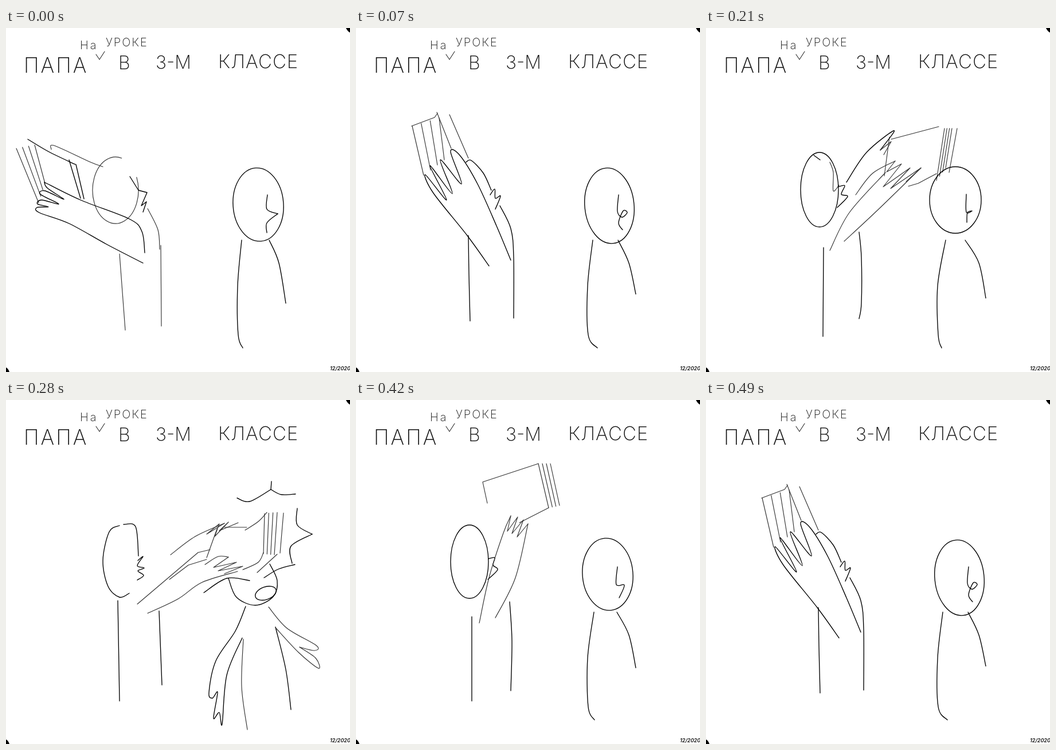
Write an HTML page with a canvas that moves like this. It is 600 by 600 pixels and loops after 560 ms.

```html
<!DOCTYPE html>
<html lang="ru">
<head>
<meta charset="utf-8">
<title>Папа на уроке в 3-м классе</title>
<style>
html, body { margin: 0; width: 100%; height: 100%; overflow: hidden; background: #fff; }
canvas { display: block; }
</style>
</head>
<body>
<canvas id="stage" width="600" height="600"></canvas>
<script>
const ctx = document.getElementById('stage').getContext('2d');
const STEP = 70;

function pen(color, width) {
  ctx.strokeStyle = color;
  ctx.lineWidth = width;
}
const ink = () => pen('#000', 1.35);
const soft = () => pen('#333', 1.15);

function line(...p) {
  ctx.beginPath();
  for (let i = 0; i < p.length; i += 2) ctx.lineTo(p[i], p[i + 1]);
  ctx.stroke();
}

// smooth stroke through the given points
function curve(...p) {
  const at = i => p[i < 0 ? i + 2 : i >= p.length ? i - 2 : i];
  const ahead = i => p[i] + (at(i + 2) - at(i - 2)) / 6;
  const behind = i => p[i] - (at(i + 2) - at(i - 2)) / 6;
  ctx.beginPath();
  ctx.moveTo(p[0], p[1]);
  for (let i = 2; i < p.length; i += 2) {
    ctx.bezierCurveTo(ahead(i - 2), ahead(i - 1), behind(i), behind(i + 1), p[i], p[i + 1]);
  }
  ctx.stroke();
}

function oval(x, y, rx, ry, tilt = 0, from = 0, to = 2 * Math.PI) {
  ctx.beginPath();
  ctx.ellipse(x, y, rx, ry, tilt, from, to);
  ctx.stroke();
}

// evenly spaced lines from a first line to a last one
function hatch(count, first, last) {
  for (let i = 0; i < count; i++) {
    line(...first.map((v, k) => v + (last[k] - v) * i / (count - 1)));
  }
}

function pupil(x, y, rx, ry, tilt, neck, foot, hand) {
  ink();
  oval(x, y, rx, ry, tilt);
  curve(neck, 370, 404, 450, 405, 535, foot, 558);
  curve(870 - neck, 370, 476, 410, 488, hand);
}

function write(text, x, y, size, spacing = 0, style = '200') {
  ctx.font = `${style} ${size}px Inter, "Open Sans", sans-serif`;
  ctx.letterSpacing = spacing + 'px';
  ctx.fillText(text, x, y);
}

function caption() {
  ctx.fillStyle = '#111';
  write('ПАПА', 31, 78, 36, 3);
  write('В', 196, 72, 32);
  write('3-М', 261, 71, 32);
  write('КЛАССЕ', 370, 70, 33, 1);
  write('На', 129, 37, 20, 3);
  write('УРОКЕ', 174, 32, 20, 2);
  write('12/2020', 565, 597, 9, 0, 'italic 600');
  soft();
  line(157, 46, 163, 55, 172, 41);
  ctx.fillStyle = '#000';
  ctx.fill(new Path2D('M593 0Q595 5 600 8V0ZM0 592Q4 594 6 600H0Z'));
}

function swungBack() {
  soft();
  oval(191, 283, 40, 58, 0, -0.4, 4.98);
  hatch(4, [18, 210, 57, 305], [50, 204, 68, 271]);
  curve(79, 212, 84, 205, 145, 233, 169, 242);
  line(198, 394, 208, 527);
  curve(247, 315, 265, 352, 268, 386);
  line(270, 379, 271, 520);
  ink();
  curve(38, 194, 75, 216, 121, 238);
  hatch(2, [110, 230, 130, 297], [122, 238, 136, 298]);
  line(216, 259, 231, 283, 246, 287, 236, 310, 245, 303, 239, 321);
  curve(67, 269, 130, 300, 215, 333, 237, 355, 242, 392);
  curve(67, 269, 72, 279, 101, 299, 68, 284, 60, 290, 92, 307, 62, 300, 55, 307, 74, 312, 54, 313, 58, 322, 110, 341, 175, 377, 239, 410);
  pupil(440, 308, 44, 64, -0.07, 411, 413, 480);
  curve(456, 291, 455, 316, 474, 324);
  curve(474, 324, 455, 340, 455, 357);
}

function overShoulder() {
  soft();
  hatch(4, [98, 171, 118, 257], [145, 157, 154, 230]);
  line(97, 171, 137, 156, 142, 149);
  hatch(2, [141, 147, 166, 210], [163, 151, 196, 227]);
  ink();
  curve(232, 415, 194, 362, 135, 288, 121, 256, 158, 300, 129, 240, 168, 289, 147, 230, 184, 272, 165, 216, 181, 222, 212, 272, 245, 345, 270, 405);
  curve(192, 234, 201, 231, 222, 253, 236, 283);
  curve(234, 291, 242, 281, 243, 297, 252, 293, 243, 316);
  curve(251, 310, 270, 350, 275, 400, 275, 506);
  curve(196, 362, 197, 430, 199, 511);
  pupil(442, 310, 43, 66, -0.1, 413, 421, 464);
  curve(458, 291, 456, 320, 464, 330, 473, 322, 466, 319, 458, 340, 465, 352);
}

function overhead() {
  ink();
  oval(198, 282, 33, 64);
  curve(231, 277, 242, 275, 239, 288, 247, 296, 230, 313);
  line(202, 378, 202, 525);
  curve(268, 352, 272, 420, 270, 507);
  soft();
  line(229, 180, 221, 143, 318, 111);
  hatch(4, [318, 111, 336, 188], [339, 111, 355, 184]);
  line(285, 214, 336, 188);
  curve(215, 389, 232, 310, 257, 232, 270, 202);
  line(270, 202, 264, 229, 282, 204, 272, 233, 292, 209, 281, 239, 300, 216);
  curve(300, 216, 278, 310, 243, 380);
  pupil(439, 304, 44, 63, -0.08, 415, 416, 467);
  curve(456, 291, 454, 322, 468, 323, 459, 345);
}

function comingDown() {
  soft();
  hatch(4, [416, 175, 402, 266], [429, 175, 418, 244]);
  line(438, 175, 424, 252);
  line(323, 194, 406, 172);
  line(353, 276, 370, 271, 402, 254);
  line(320, 190, 311, 258);
  curve(216, 234, 222, 252, 222, 284, 232, 274);
  ink();
  oval(198, 282, 33, 65);
  line(188, 222, 199, 230);
  curve(231, 277, 242, 275, 236, 290, 247, 294, 229, 313);
  line(205, 383, 204, 538);
  curve(267, 356, 271, 400, 271, 480, 267, 507);
  curve(245, 269, 280, 217, 328, 179, 304, 213);
  soft();
  line(304, 213, 323, 198, 310, 221);
  curve(261, 291, 290, 254, 330, 232);
  line(330, 232, 315, 251, 341, 237, 309, 277, 356, 244, 322, 280, 375, 244, 349, 268);
  curve(216, 388, 250, 322, 313, 252);
  curve(241, 372, 300, 317, 375, 244);
  pupil(435, 300, 45, 58, 0, 418, 411, 471);
  curve(454, 290, 454, 321, 464, 319, 456, 322, 455, 339);
}

function impact() {
  soft();
  hatch(4, [451, 198, 449, 268], [473, 196, 468, 270]);
  line(484, 197, 478, 267);
  line(368, 225, 350, 275);
  line(381, 222, 420, 222);
  curve(417, 227, 440, 212, 455, 196);
  curve(413, 296, 440, 283, 449, 266);
  line(438, 301, 473, 269);
  curve(287, 270, 330, 238, 381, 215);
  line(381, 215, 350, 234, 372, 216, 364, 238, 388, 213, 372, 228, 405, 214);
  line(229, 356, 335, 266, 356, 261);
  line(285, 313, 318, 288, 350, 278);
  curve(347, 287, 370, 273, 388, 274);
  line(388, 274, 362, 292, 402, 283, 370, 298, 413, 290, 381, 303);
  curve(247, 372, 300, 347, 342, 318, 404, 299);
  ink();
  curve(215, 337, 198, 344, 178, 325, 169, 280, 180, 230, 198, 219);
  curve(205, 217, 226, 221, 231, 272);
  curve(230, 280, 239, 273, 229, 289, 241, 293, 230, 298, 240, 306, 229, 314);
  line(195, 350, 198, 525);
  line(267, 368, 272, 497);
  // shouting face
  curve(388, 311, 402, 344, 435, 358, 466, 343, 473, 315, 460, 286);
  curve(345, 336, 385, 311, 425, 315);
  curve(450, 310, 475, 295, 504, 287);
  oval(453, 337, 19, 11, -0.35);
  // shock marks
  curve(403, 171, 425, 177, 462, 156);
  line(462, 156, 463, 142);
  curve(462, 156, 480, 165, 505, 164);
  curve(508, 189, 508, 218, 534, 234);
  curve(534, 234, 497, 255, 499, 285);
  // flung arms
  curve(418, 360, 400, 403, 366, 455, 354, 510, 360, 520, 369, 510, 362, 555, 372, 545, 377, 565, 385, 480, 412, 415);
  curve(470, 396, 488, 470, 497, 540);
  soft();
  curve(414, 417, 411, 500, 421, 575);
  curve(458, 361, 490, 398, 541, 428, 538, 437, 512, 431);
  curve(512, 431, 540, 450, 545, 468, 510, 440, 470, 397);
}

const swing = [swungBack, overShoulder, overhead, comingDown, impact, comingDown, overhead, overShoulder];

function draw() {
  ctx.fillStyle = '#fff';
  ctx.fillRect(0, 0, 600, 600);
  ctx.lineCap = ctx.lineJoin = 'round';
  caption();
  swing[Math.floor(performance.now() / STEP) % swing.length]();
  requestAnimationFrame(draw);
}
draw();
</script>
</body>
</html>
```
